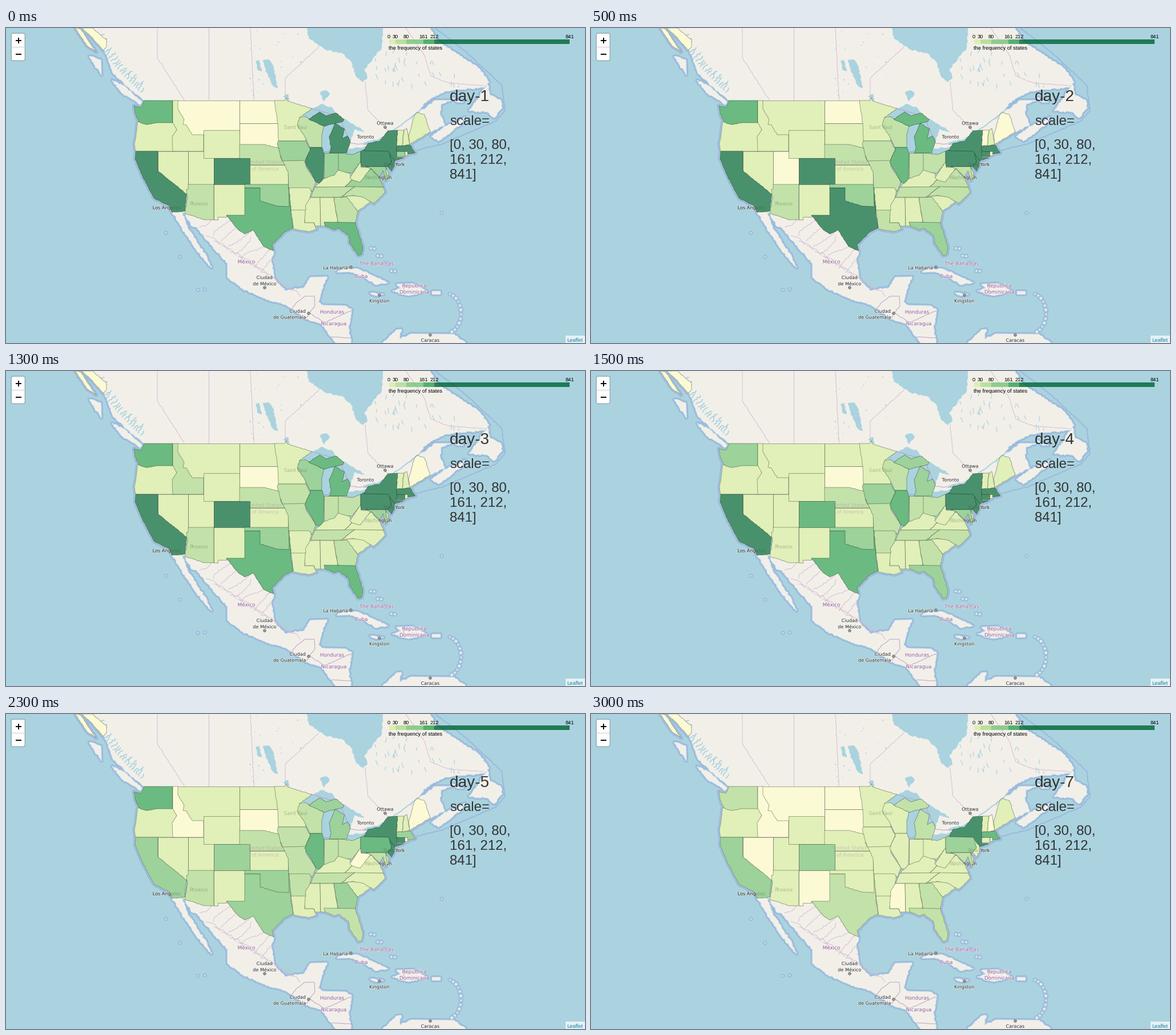
Animation of 1014 by 552 pixels, one loop 3.5 s. Source, as a matplotlib script:

```python
import math
import random

import matplotlib.pyplot as plt
import numpy as np
from matplotlib.animation import FuncAnimation
from matplotlib.colors import to_rgb
from matplotlib.patches import Circle, FancyBboxPatch, Polygon, Rectangle
from matplotlib.patheffects import withStroke

W, H, DPI = 1014, 552, 64
PX = 72 / DPI  # points per pixel
WATER, LAND, SHORE, INNER = "#aad3df", "#f2efe9", "#9db8de", "#a9cfe0"
BORDER, COUNTRY, CITY, INK = "#d3b9d3", "#9a6a9f", "#3d3d3d", "#333333"
PALETTE = ["#ffffcc", "#d9f0a3", "#addd8e", "#78c679", "#31a354", "#006837"]
FILLS = [0.7 * np.array(to_rgb(c)) + 0.3 * np.array(to_rgb(LAND)) for c in PALETTE]
SCALE = [0, 30, 80, 161, 212, 841]

fig = plt.figure(figsize=(W / DPI, H / DPI), dpi=DPI, facecolor=WATER)
ax = fig.add_axes([0, 0, 1, 1])
ax.set(xlim=(0, W), ylim=(H, 0))
ax.axis("off")
states = []


def rough(xy, amp, closed=True):
    """Crinkle slanted edges; a shared edge gets the same crinkle on both sides."""
    pts = list(zip(xy[::2], xy[1::2]))
    out = []
    for a, b in zip(pts, pts[1:] + pts[:1] if closed else pts[1:]):
        out.append(a)
        if min(abs(a[0] - b[0]), abs(a[1] - b[1])) < 2:
            continue
        p, q = np.array(sorted((a, b)))
        size = math.dist(a, b)
        normal = np.array([p[1] - q[1], q[0] - p[0]]) / size
        rng = random.Random(f"{p}{q}")
        n = max(1, int(size / 3))
        mid = [tuple(p + (q - p) * k / n + normal * rng.uniform(-amp, amp)) for k in range(1, n)]
        out += mid if tuple(p) == a else mid[::-1]
    return out if closed else out + pts[-1:]


def shape(pts, face, z, **kw):
    return ax.add_patch(Polygon(pts, closed=True, fc=face, zorder=z, **kw))


def ground(pts):
    shape(pts, "none", 1, ec=SHORE, lw=7 * PX, joinstyle="round")
    shape(pts, "none", 1.2, ec=INNER, lw=2.6 * PX, joinstyle="round")
    shape(pts, LAND, 2, ec=LAND, lw=0.5 * PX)


def land(*xy):
    ground(rough(xy, 1.3))


def lake(*xy):
    shape(rough(xy, 1.2), WATER, 3, lw=0)


def line(*xy, color=BORDER, width=0.9, amp=0.6, z=3):
    x, y = zip(*rough(xy, amp, closed=False))
    ax.plot(x, y, color=color, lw=width * PX, zorder=z)


def state(levels, *xy):
    """Later states cover earlier ones; four numbers make a box."""
    if len(xy) == 4:
        x0, y0, x1, y1 = xy
        xy = x0, y0, x1, y0, x1, y1, x0, y1
    pts = rough(xy, 0.6)
    ground(pts)
    states.append((shape(pts, LAND, 5, ec=(0, 0, 0, 0.36), lw=0.9 * PX), levels))


def text(x, y, s, size, color="black", ha="center", va="center_baseline", z=7,
         font="Liberation Sans", **kw):
    return ax.text(x, y, s, fontsize=size * PX, color=color, ha=ha, va=va,
                   zorder=z, family=font, **kw)


def label(x, y, s, size=8.1, color=CITY, ghost=False):
    t = text(x, y, s, size, color, z=4, font="DejaVu Sans")
    t.set_path_effects([withStroke(linewidth=1.6 * PX, foreground=(1, 1, 1, 0.6))])
    if ghost:  # shows through the state fill
        text(x, y, s, size, color, z=6, font="DejaVu Sans", alpha=0.3)


def isle(x, y, r=0.8):
    ax.add_patch(Circle((x, y), r + 2.2, fc=INNER, ec=SHORE, lw=1.4 * PX, zorder=1))
    ax.add_patch(Circle((x, y), r, fc=LAND, lw=0, zorder=2))


# Canada
land(150, 0, 172, 38, 187, 78, 210, 101, 242, 126, 490, 140, 600, 225, 668, 220,
     743, 182, 768, 170, 760, 150, 762, 133, 779, 127, 752, 127, 706, 161, 738, 127,
     768, 111, 838, 104, 846, 95, 830, 72, 785, 42, 757, 24, 742, 0)
land(186, 92, 210, 104, 238, 130, 235, 134, 205, 115)
land(146, 50, 166, 56, 167, 82, 156, 66)
land(745, 190, 770, 172, 790, 165, 803, 156, 798, 168, 757, 198)
land(843, 96, 828, 122, 811, 145, 843, 147, 855, 157, 869, 140, 866, 126, 848, 118)
land(781, 122, 801, 130, 790, 130)
lake(527, 0, 530, 18, 560, 38, 590, 45, 605, 60, 613, 85, 625, 95, 633, 88, 628, 72, 658, 35, 660, 0)
lake(510, 150, 536, 141, 553, 133, 572, 140, 585, 156, 560, 172)
lake(548, 165, 590, 158, 618, 174, 628, 182, 610, 178, 597, 215, 550, 215)
lake(595, 222, 600, 211, 632, 208, 622, 222)
lake(625, 201, 657, 193, 660, 202, 635, 206)
lake(437, 58, 444, 56, 448, 76, 441, 74)
lake(450, 56, 460, 55, 468, 66, 476, 105, 468, 102, 455, 76)
lake(485, 120, 494, 116, 496, 128)
lake(550, 113, 560, 109, 567, 115, 557, 129)
line(752, 0, 808, 44, 868, 100, 874, 145, 858, 163, 765, 203, 720, 214, color=SHORE, width=2, z=1)

# Mexico and further south
land(291, 322, 314, 361, 333, 388, 360, 420, 352, 402, 333, 372, 318, 350, 308, 322)
land(310, 320, 325, 347, 335, 350, 352, 372, 388, 412, 388, 437, 412, 456, 462, 478,
     490, 485, 525, 510, 552, 518, 578, 552, 604, 552, 600, 525, 606, 495, 595, 487,
     556, 486, 547, 480, 553, 458, 562, 436, 533, 437, 522, 455, 488, 460, 470, 440,
     465, 402, 469, 391, 424, 335, 364, 325)
land(660, 552, 684, 529, 692, 528, 689, 545, 712, 536, 785, 537, 805, 552)
land(580, 428, 592, 421, 618, 423, 669, 446, 648, 450, 626, 436, 602, 427)
land(677, 461, 706, 469, 737, 461, 712, 448, 684, 449, 692, 456)
land(746, 461, 760, 461, 760, 466, 746, 466)
land(638, 464, 661, 467, 648, 469)
for k in range(12):  # Lesser Antilles
    a = math.radians(13 * k - 75)
    isle(771 + 26 * math.cos(a), 500 + 35 * math.sin(a), 1.2 + k % 3 * 0.4)
for k in range(8):  # Bahamas
    isle(639 + 6 * k, 383 + 6.6 * k + 3 * (-1) ** k, 1.4)
for x, y in ((280, 359), (336, 459), (348, 458), (305, 401), (763, 324)):
    isle(x, y)

# United States
state("0000000", 121, 0, 131, 2, 158, 42, 141, 30)
state("0000000", 133, 0, 151, 0, 176, 21, 176, 33, 170, 39, 152, 18)
state("0111100", 298, 127, 409, 188)                                             # MT
state("4443432", 224, 136, 236, 139, 242, 127, 292, 127, 292, 170, 235, 170, 226, 150)  # WA
state("1111111", 231, 164, 245, 169, 265, 166, 299, 166, 299, 216, 227, 216, 225, 205)  # OR
state("1121010", 292, 127, 301, 127, 301, 142, 312, 160, 310, 169, 316, 170, 326, 187,
      346, 187, 346, 216, 292, 216, 291, 190, 299, 178, 292, 166)                # ID
state("1111110", 266, 216, 319, 291)                                             # NV
state("5555333", 227, 216, 266, 216, 266, 250, 316, 291, 313, 321, 291, 323,
      286, 312, 259, 298, 239, 260, 226, 230)                                    # CA
state("1011111", 319, 216, 364, 274)                                             # UT
state("1111111", 346, 179, 409, 228)                                             # WY
state("0011100", 409, 127, 476, 167)                                             # ND
state("0100000", 409, 167, 478, 212)                                             # SD
state("2222211", 409, 204, 452, 204, 480, 211, 490, 240, 409, 240)               # NE
state("5554353", 364, 228, 427, 274)                                             # CO
state("2221221", 319, 274, 364, 274, 364, 336, 347, 336, 313, 325, 318, 297, 316, 283, 319, 282)  # AZ
state("1111110", 364, 274, 418, 274, 418, 328, 386, 328, 386, 331, 371, 331, 371, 336, 364, 336)  # NM
state("1111101", 427, 240, 494, 274)                                             # KS
state("4544332", 418, 280, 499, 280, 499, 330, 503, 350, 488, 358, 466, 380, 469, 391,
      451, 383, 433, 354, 418, 361, 406, 353, 386, 328, 418, 328)                # TX
state("1211111", 499, 315, 526, 315, 523, 341, 539, 341, 544, 353, 530, 357, 503, 352)  # LA
state("1112201", 495, 275, 535, 275, 533, 297, 525, 319, 499, 319)               # AR
state("3333311", 418, 274, 495, 274, 496, 313, 475, 312, 445, 303, 445, 280, 418, 280)  # OK
state("1111111", 470, 127, 488, 127, 491, 122, 493, 128, 536, 141, 514, 157, 525, 190,
      525, 198, 477, 198, 476, 167)                                              # MN
state("2222211", 480, 225, 527, 225, 525, 242, 543, 270, 536, 287, 531, 280, 495, 280, 494, 252)  # MO
state("3223211", 477, 198, 525, 198, 533, 213, 524, 232, 484, 233, 475, 203)     # IA
state("3222221", 557, 219, 582, 264)                                             # IN
state("3222221", 582, 219, 606, 222, 621, 216, 621, 235, 606, 254, 582, 254)     # OH
state("3211111", 593, 279, 606, 266, 640, 247, 655, 264, 661, 279)               # VA
state("1111111", 541, 279, 556, 264, 575, 258, 582, 249, 602, 255, 606, 266, 593, 279)  # KY
state("5444421", 532, 209, 553, 209, 557, 219, 556, 264, 549, 272, 543, 270, 523, 235, 533, 213)  # IL
state("2232211", 514, 157, 524, 155, 557, 172, 553, 186, 553, 209, 532, 209, 523, 190, 510, 170)  # WI
state("5443312", 530, 160, 549, 147, 560, 154, 578, 149, 592, 160, 590, 164, 557, 172)  # MI
state("5443312", 577, 167, 593, 177, 589, 194, 598, 189, 603, 199, 597, 219,
      566, 219, 569, 210, 566, 190)                                              # MI
state("2222221", 533, 297, 541, 279, 611, 278, 586, 297)                         # TN
state("1111110", 533, 297, 550, 297, 551, 347, 541, 347, 539, 341, 523, 341, 525, 310)  # MS
state("1111111", 550, 297, 574, 297, 581, 340, 559, 347, 551, 347)               # AL
state("1111111", 590, 294, 637, 294, 637, 306, 616, 321)                         # SC
state("2222312", 574, 297, 597, 296, 616, 321, 612, 343, 582, 343)               # GA
state("2212111", 611, 278, 661, 279, 664, 288, 644, 308, 627, 297, 607, 293, 586, 297)  # NC
state("4343222", 557, 340, 612, 341, 625, 383, 623, 397, 617, 399, 602, 378, 600, 364,
      583, 351, 575, 354, 559, 347)                                              # FL
state("5555433", 621, 216, 627, 213, 675, 216, 675, 240, 668, 243, 621, 243)     # PA
state("1111001", 602, 262, 621, 235, 622, 244, 640, 245, 620, 270, 606, 266)     # WV
state("3233222", 630, 243, 665, 243, 671, 260, 665, 268, 660, 250, 655, 262, 640, 247)  # MD
state("1111101", 665, 243, 671, 259, 667, 258)                                   # DE
state("5555511", 672, 220, 681, 226, 680, 243, 675, 251, 668, 243, 675, 235)     # NJ
state("5555555", 627, 215, 634, 202, 655, 198, 669, 180, 686, 179, 684, 227, 697, 227,
      681, 233, 669, 216)                                                        # NY
state("1011101", 686, 179, 697, 179, 694, 207, 684, 207)                         # VT
state("1111110", 697, 179, 702, 176, 707, 204, 694, 207)                         # NH
state("1001011", 705, 190, 715, 153, 720, 148, 733, 152, 743, 182, 707, 204)     # ME
state("5555324", 684, 207, 708, 205, 717, 219, 705, 221, 684, 216)               # MA
state("3555511", 684, 216, 698, 225)                                             # CT
state("1011011", 698, 216, 703, 223)                                             # RI

# Small waters, fjords and borders
rng = random.Random(12)
for _ in range(30):
    x, y = rng.uniform(425, 520), rng.uniform(4, 120)
    ax.add_patch(Circle((x, y), rng.uniform(0.4, 1.3), fc=WATER, lw=0, zorder=3))
for _ in range(34):
    x, y = rng.uniform(645, 795), rng.uniform(36, 100)
    if x - y < 720:
        line(x, y, x + rng.uniform(-4, 4), y + rng.uniform(4, 9), color=WATER, width=1.2)
for k in range(20):
    x, y = 160 + 4 * k, 18 + 98 * (k / 20) ** 0.75
    line(x, y, x + rng.uniform(5, 13), y - rng.uniform(4, 13), color=WATER, width=1.8, amp=2)
line(657, 193, 688, 173, 722, 147, color=WATER, width=2)
line(265, 0, 265, 52, 312, 126)
line(355, 0, 355, 126)
line(428, 0, 434, 126)
line(489, 126, 489, 88, 548, 33)
line(629, 94, 634, 144, 668, 179)
line(700, 0, 733, 48, 744, 84, 774, 96, 836, 101)
line(536, 141, 583, 155, 604, 202, 634, 204, color="#b899c0")
for k in range(11):  # Mexican states
    x, y = 345 + 14 * k, 352 + 9 * k
    pts = [c for j in range(4) for c in (x + 11 * j + rng.uniform(-6, 6), y + 2 * k - 9 * j + rng.uniform(-5, 5))]
    if k < 8:
        line(*pts, amp=1.2)
    line(x + 5, y + 12, x + 22, y + 18, x + 30, y + 28, amp=1.2)
line(500, 492, 510, 480, 524, 470, 540, 470, 541, 486, 526, 508, color="#b899c0")
line(532, 500, 558, 516, 605, 495, color="#b899c0")
line(571, 541, 602, 543, color="#b899c0")
line(698, 447, 696, 464, color="#b899c0")

# Place names
for x, y, s in ((507, 173.5, "Saint Paul"), (680, 238.5, "New York"), (652, 261.5, "Washington"),
                (337, 307.5, "Phoenix"), (281, 314, "Los Angeles")):
    label(x, y, s, ghost=True)
for x, y, s in ((664, 166, "Ottawa"), (630, 190, "Toronto"), (453, 436.5, "Ciudad"),
                (453, 447.5, "de México"), (511, 495.5, "Ciudad"), (497, 506, "de Guatemala"),
                (577, 419.5, "La Habana"), (654, 477.5, "Kingston"), (743, 546.5, "Caracas")):
    label(x, y, s)
for x, y, s in ((454, 235, "United States"), (454, 246, "of America"), (421, 409, "México"),
                (571, 497, "Honduras"), (574, 517.5, "Nicaragua"), (649, 412, "The Bahamas"),
                (622, 434.5, "Cuba"), (715, 451, "República"), (715, 462, "Dominicana")):
    label(x, y, s, 8.8, COUNTRY, ghost="States" in s or "America" in s)
for x, y in ((664, 174), (453, 455), (530, 500), (604, 419), (654, 468), (743, 538)):
    ax.add_patch(Circle((x, y), 2.3, fc="#999999", ec="#666666", lw=0.8 * PX, zorder=4))

# Legend
ticks = [670.5 + 316.5 * v / SCALE[-1] for v in SCALE]
for x0, x1, color in zip(ticks, ticks[1:], PALETTE[1:]):
    ax.add_patch(Rectangle((x0, 19.5), x1 - x0, 8.5, fc=color, alpha=0.82, lw=0, zorder=6))
for x, v in zip(ticks, SCALE):
    text(x, 14.5, str(v), 9.2)
text(670, 34.5, "the frequency of states", 9.3, ha="left")

# Zoom buttons and credit
ax.add_patch(FancyBboxPatch((10, 10), 22.5, 46.5, boxstyle="round,pad=0.8,rounding_size=3",
                            fc="white", ec="#8fa5ad", lw=1.3 * PX, zorder=6))
ax.hlines(33, 9.5, 33, color="#cccccc", lw=PX, zorder=7)
ax.hlines([21.5, 45.5], 16.5, 26.5, color="black", lw=1.9 * PX, zorder=7)
ax.vlines(21.5, 16.5, 26.5, color="black", lw=1.9 * PX, zorder=7)
ax.add_patch(Rectangle((980, 539), 34, 13, fc="white", alpha=0.7, lw=0, zorder=6))
text(996.5, 546.5, "Leaflet", 9.2, "#1583a6")

# Caption
day = text(777, 128, "", 28, INK, "left", "baseline")
text(777, 170, "scale=", 24, INK, "left", "baseline")
for k, row in enumerate(("[0, 30, 80,", "161, 212,", "841]")):
    text(777, 212 + 26 * k, row, 24, INK, "left", "baseline")


def update(i):
    day.set_text(f"day-{i + 1}")
    for patch, levels in states:
        patch.set_facecolor(FILLS[int(levels[i])])
    return [day] + [p for p, _ in states]


anim = FuncAnimation(fig, update, frames=7, interval=500, init_func=lambda: update(0),
                     repeat=True, blit=False)
plt.show()
```
